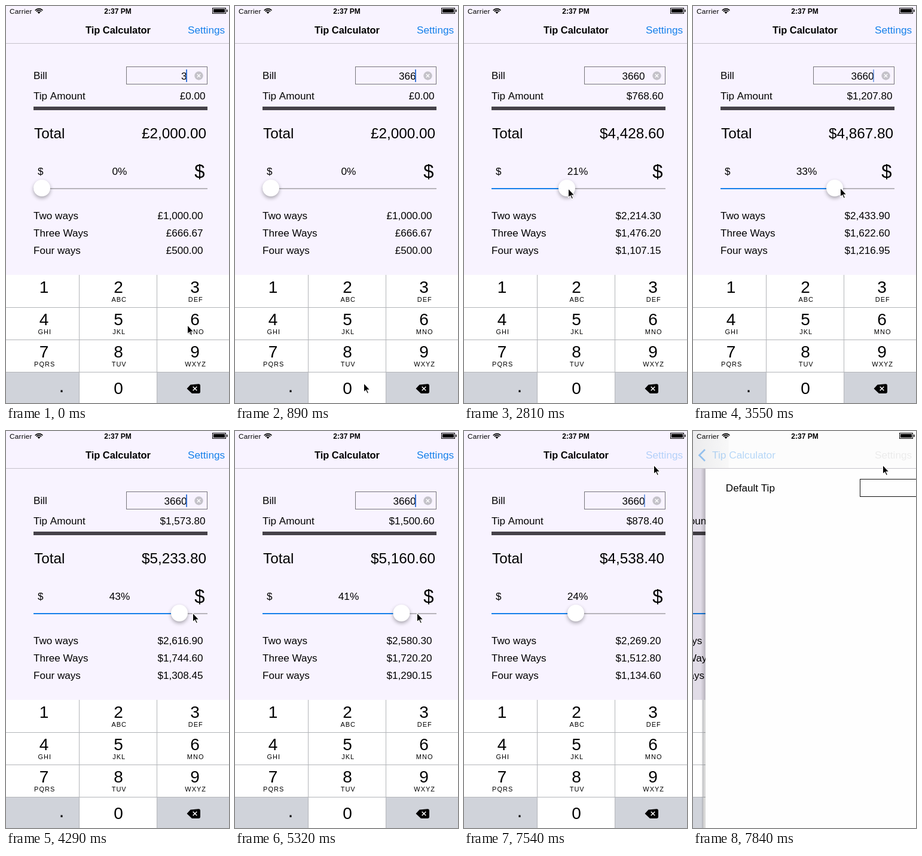
Animation of 373 by 663 pixels, one loop 7990 ms. Source, as an HTML page with a canvas:

```html
<!DOCTYPE html>
<html lang="en">
<head>
<meta charset="utf-8">
<title>Tip Calculator</title>
<style>
html, body { margin: 0; width: 100%; height: 100%; overflow: hidden; background: #f8f3ff; }
canvas { display: block; }
</style>
</head>
<body>
<canvas id="stage" width="373" height="663"></canvas>
<script>
const W = 373, H = 663, LOOP = 7990, STEP = 148;
const BLUE = '#1580ea', BACK = '#f8f3ff';
const c = document.getElementById('stage').getContext('2d');

// Rows of [time, x, y] for the pointer and [time, x] for the slider knob
const POINTER = [
  [0, 303, 533], [600, 303, 533], [888, 215, 630], [1040, 213, 629],
  [1190, 150, 395], [1490, 62, 303], [1640, 54, 302], [2072, 75, 302],
  [2368, 104, 303], [2812, 174, 305], [3552, 246, 304], [4292, 312, 304],
  [4740, 362, 304], [5000, 362, 304], [5920, 200, 303], [6068, 188, 303],
  [6366, 188, 303], [6512, 162, 247], [7104, 312, 19], [7400, 317, 52], [7548, 317, 57]
];
const KNOB = [
  [0, 60], [1640, 60], [2072, 81], [2368, 107], [2812, 172], [3552, 237],
  [4292, 290], [4740, 323], [5000, 323], [5920, 198], [6068, 187]
];
const KEYS = ['', 'ABC', 'DEF', 'GHI', 'JKL', 'MNO', 'PQRS', 'TUV', 'WXYZ'];

function along(rows, t) {
  const next = rows.findIndex(r => r[0] > t);
  if (next < 0) return rows[rows.length - 1].slice(1);
  const a = rows[next - 1], b = rows[next], k = (t - a[0]) / (b[0] - a[0]);
  return a.slice(1).map((v, i) => v + (b[i + 1] - v) * k);
}

function rect(x, y, w, h, color) {
  c.fillStyle = color;
  c.fillRect(x, y, w, h);
}

function text(s, x, y, size = 17.1, align = 'left', color = '#000', weight = 400, spacing = 0) {
  c.font = `${weight} ${size}px "Liberation Sans", Arial, sans-serif`;
  c.letterSpacing = spacing + 'px';
  c.textAlign = align;
  c.fillStyle = color;
  c.fillText(s, x, y);
}

function poly(points, color) {
  c.beginPath();
  points.forEach(p => c.lineTo(...p));
  c.closePath();
  c.fillStyle = color;
  c.fill();
}

function disc(x, y, r, color) {
  c.beginPath();
  c.arc(x, y, r, 0, Math.PI * 2);
  c.fillStyle = color;
  c.fill();
}

function line(points, color, width) {
  c.beginPath();
  points.forEach(p => c.lineTo(...p));
  c.strokeStyle = color;
  c.lineWidth = width;
  c.stroke();
}

function cross(x, y, r, color, width) {
  line([[x - r, y - r], [x + r, y + r]], color, width);
  line([[x - r, y + r], [x + r, y - r]], color, width);
}

function faded(alpha, draw) {
  c.save();
  c.globalAlpha = Math.max(0, Math.min(1, alpha));
  draw();
  c.restore();
}

function money(sign, v) {
  return sign + v.toLocaleString('en-US', { minimumFractionDigits: 2, maximumFractionDigits: 2 });
}

function billField(t) {
  c.strokeStyle = '#77757b';
  c.lineWidth = 1;
  c.strokeRect(201.5, 101.5, 135, 29);
  text('3660'.slice(0, t < 296 ? 1 : t < 592 ? 2 : t < 1180 ? 3 : 4), 302.5, 123, 17.1, 'right');
  const blink = t < 1180 ? 1 : 0.5 + 2 * Math.sin((t - 60) / 1000 * 2 * Math.PI);
  faded(blink, () => rect(301, 106, 2, 21, '#3d78d8'));
  disc(322.5, 116.5, 7.2, '#c4c2c9');
  cross(322.5, 116.5, 2.7, '#fff', 1.3);
}

function slider(x) {
  rect(46, 304, 291, 2, '#b7b4bb');
  rect(46, 304, x - 46, 2, BLUE);
  c.save();
  c.shadowColor = 'rgba(0,0,0,.32)';
  c.shadowBlur = 6;
  c.shadowOffsetY = 3;
  disc(x, 304, 14, '#fff');
  c.restore();
}

function calculator(t) {
  const [x] = along(KNOB, t);
  const percent = Math.floor((x - 60) / 263 * 50 + 0.02);
  const edited = t > 1640;
  const sign = edited ? '$' : '£';
  const tip = edited ? 3660 * percent / 100 : 0;
  const total = edited ? 3660 + tip : 2000;

  text('Bill', 46, 122);
  billField(t);
  text('Tip Amount', 46, 156);
  text(money(sign, tip), 333.5, 156, 17.1, 'right');
  rect(46, 168, 291, 6, '#464249');
  text('Total', 47, 221, 24.3);
  text(money(sign, total), 335, 221, 24.3, 'right');
  text('$', 53, 282);
  text(percent + '%', 190, 282, 17.3, 'center');
  text('$', 332.5, 287, 31, 'right');
  slider(x);
  ['Two ways', 'Three Ways', 'Four ways'].forEach((label, i) => {
    text(label, 46, 356 + i * 29);
    text(money(sign, total / (i + 2)), 329.5, 356 + i * 29, 17.1, 'right');
  });
}

function keyboard(t) {
  const GREY = '#d0d3da', RULE = '#b3b5b9';
  rect(0, 449, W, 214, '#fff');
  if ((t >= 148 && t < 296) || (t >= 444 && t < 592)) rect(253, 504, 120, 53, GREY);
  rect(0, 611, 122, 52, GREY);
  rect(253, 611, 120, 52, GREY);
  if (t >= 1030 && t < 1180) rect(123, 611, 130, 52, GREY);
  [503, 557, 611].forEach(y => rect(0, y, W, 1, RULE));
  [122, 252].forEach(x => rect(x, 449, 1, 214, RULE));
  KEYS.forEach((letters, i) => {
    const x = [63.5, 188, 316][i % 3], y = 479 + Math.floor(i / 3) * 54;
    text(i + 1, x, y, 28, 'center');
    text(letters, x + 1.2, y + 15, 11, 'center', '#000', 400, 1);
  });
  text('0', 188, 648, 28, 'center');
  rect(91.5, 641.5, 3, 3.5, '#000');
  c.beginPath();
  c.moveTo(302.5, 639);
  c.lineTo(308.5, 632.5);
  c.arcTo(325, 631, 325, 634, 3);
  c.arcTo(325, 647, 322, 647, 3);
  c.lineTo(311, 647);
  c.closePath();
  c.fillStyle = '#000';
  c.fill();
  cross(316, 639, 3.3, '#fff', 1.5);
}

function settings(x) {
  const shade = c.createLinearGradient(x - 8, 0, x, 0);
  shade.addColorStop(0, 'rgba(0,0,0,0)');
  shade.addColorStop(1, 'rgba(0,0,0,.2)');
  rect(x - 8, 0, 8, H, shade);
  rect(x, 0, W, H, '#fefefe');
  text('Default Tip', x + 34, 101);
  c.strokeStyle = '#111';
  c.lineWidth = 1;
  c.strokeRect(Math.round(x) + 258.5, 80.5, 114, 29);
}

function navBar(t, p) {
  if (p) {
    rect(0, 0, W, 62, '#fcfcfc');
    const edge = 43 + (W - 43) * (1 - p) * 0.9 - 18;
    const haze = c.createLinearGradient(0, 0, edge + 18, 0);
    haze.addColorStop(0, '#ebebed');
    haze.addColorStop(1, '#f8f8f8');
    rect(0, 0, edge + 18, 62, haze);
  } else {
    rect(0, 0, W, 62, BACK);
  }
  rect(0, 62, W, 1, '#c6c3ca');
  const x = 133 - 107 * p;
  faded(1 - 1.5 * p, () => text('Tip Calculator', x, 46, 16.4, 'left', '#000', 700));
  faded(0.32 * p, () => text('Tip Calculator', x, 46, 17.3, 'left', BLUE, 400));
  faded(0.45 * p, () => line([[20, 31], [10.5, 40.5], [20, 50]], BLUE, 2.6));
  if (p) faded(0.3 * (1 - p) + 0.05, () => text('Settings', 304, 46, 17.2));
  else faded(t > 7540 ? 0.3 : 1, () => text('Settings', 304, 46, 17.2, 'left', BLUE));
}

function statusBar() {
  text('Carrier', 6, 12.5, 11.8, 'left', '#000', 400, 0.25);
  [9, 6.2].forEach(r => {
    c.beginPath();
    c.arc(55, 13, r - 0.6, -Math.PI * 0.77, -Math.PI * 0.23);
    c.strokeStyle = '#000';
    c.lineWidth = 1.6;
    c.stroke();
  });
  poly([[55, 13], [52.4, 10.2], [55, 9.2], [57.6, 10.2]], '#000');
  text('2:37 PM', 187, 12.5, 12, 'center', '#000', 700);
  c.strokeStyle = '#000';
  c.lineWidth = 1;
  c.strokeRect(345.5, 3.5, 22, 9);
  rect(347, 5, 19, 6, '#000');
  rect(369, 6, 1.5, 4, '#000');
}

function pointer(t) {
  const [x, y] = along(POINTER, t);
  c.save();
  c.translate(Math.round(x), Math.round(y));
  poly([[0, -1], [0, 16], [3.6, 12.8], [6.2, 18], [9, 16.6], [6.6, 11.6], [12, 11.4]], '#fff');
  poly([[1, 1.2], [1, 13.6], [4, 11], [6.6, 16.6], [7.8, 16], [5.2, 10.6], [9.6, 10.4]], '#000');
  c.restore();
}

function draw(t) {
  // Push progress towards the settings screen
  const p = t > 7550 ? 1 - Math.exp(-(t - 7548) * 0.00974) : 0;
  rect(0, 0, W, H, BACK);
  c.save();
  c.translate(-112 * p, 0);
  calculator(t);
  c.restore();
  rect(0, 0, W, H, `rgba(0,0,0,${0.1 * p})`);
  c.save();
  c.translate(-112 * p, 0);
  keyboard(t);
  c.restore();
  if (p) settings(W * (1 - p));
  navBar(t, p);
  statusBar();
  pointer(t);
}

function tick() {
  const t = performance.now() % LOOP;
  draw(Math.floor(t / STEP + 0.08) * STEP);
  requestAnimationFrame(tick);
}
tick();
</script>
</body>
</html>
```
